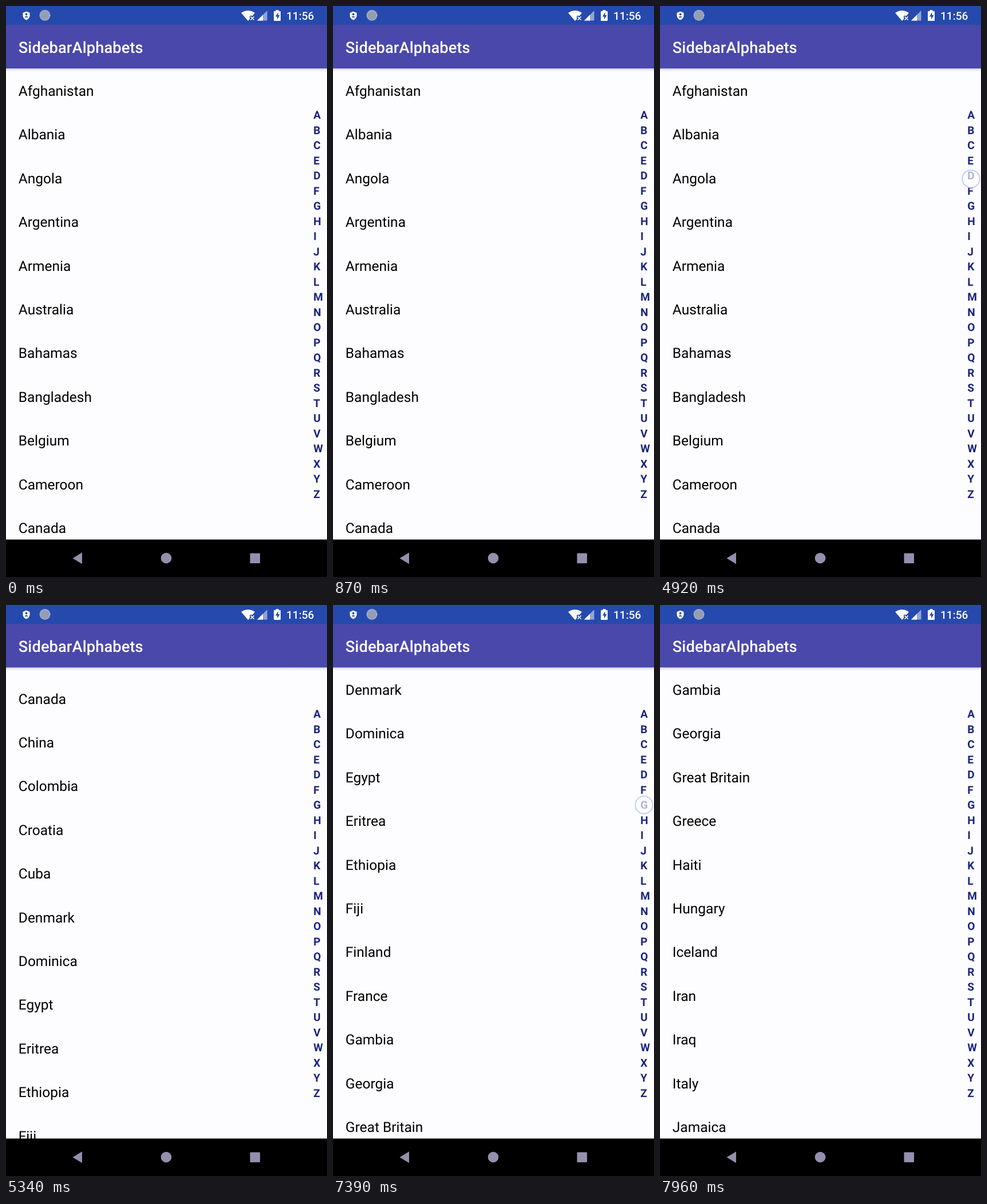
Write an HTML page that moves like this. It is 561x998 px and loops after 8000 ms.

```html
<!DOCTYPE html>
<html lang="en">
<head>
<meta charset="utf-8">
<title>SidebarAlphabets</title>
<style>
  html, body { margin: 0; width: 100%; height: 100%; overflow: hidden; background: #fdfdff; }
  svg { display: block; width: 561px; height: 998px; font-family: Roboto, sans-serif; text-rendering: geometricPrecision; }
  #list { font-size: 24.5px; }
  #index { font-size: 19.1px; font-weight: 700; fill: #1a237e; }
  .bar { fill: #fff; font-weight: 500; }
  .title { font-size: 27.27px; letter-spacing: .08px; }
  .clock { font-size: 19.1px; }
</style>
</head>
<body>
<svg viewBox="0 0 561 998">
  <defs>
    <linearGradient id="shadow" x2="0" y2="1">
      <stop offset="0" stop-color="#b9b9dc"/>
      <stop offset=".3" stop-color="#e4e4fa"/>
      <stop offset="1" stop-color="#fdfdff"/>
    </linearGradient>
  </defs>
  <rect width="561" height="998" fill="#fdfdff"/>
  <rect y="109" width="561" height="6" fill="url(#shadow)"/>
  <g id="list"></g>
  <g id="index"></g>
  <g id="touch">
    <circle r="15.3" fill="#fff" fill-opacity=".66" stroke="#c3cdf8" stroke-width="2"/>
  </g>

  <rect y="33" width="561" height="76" fill="#4a48ab"/>
  <rect width="561" height="33" fill="#2649ad"/>
  <text class="bar title" x="21.8" y="81.5">SidebarAlphabets</text>
  <text class="bar clock" x="490" y="24">11:56</text>

  <g fill="#fff">
    <path d="M35.5 9.500l6 2.400v4.600c0 4-2.800 6.700-6 8c-3.200-1.300-6-4-6-8v-4.600z"/>
    <path d="M411 12q12-8 24 0l-4 5h-5v6l-3 3z"/>
    <path d="M439 25.500l10-10v10z"/>
    <path d="M439 25.500l17.500-17.500v17.500z" opacity=".5"/>
    <path d="M471.500 9v-2h5v2h2.500q1 0 1 1v15q0 1-1 1h-10q-1 0-1-1v-15q0-1 1-1z"/>
  </g>
  <path d="M427.500 18.500l6 6m0-6l-6 6" stroke="#fff" stroke-width="1.700"/>
  <path d="M475.500 11l-4.500 7.500h3v5l4.500-7.500h-3z" fill="#2649ad"/>
  <circle cx="35.500" cy="14.500" r="1.900" fill="#2649ad"/>
  <path d="M32.300 20q3.200-4.500 6.400 0z" fill="#2649ad"/>
  <circle cx="68" cy="16.300" r="8.500" fill="#959db2"/>
  <circle cx="68" cy="16.300" r="8.700" fill="none" stroke="#d5d9e4" stroke-width="1.500" stroke-dasharray="1.500 1"/>

  <rect y="932.5" width="561" height="65.5" fill="#000"/>
  <g fill="#9390ae">
    <path d="M116.500 965.300l16.500-10v20z"/>
    <circle cx="280" cy="965" r="9.300"/>
    <rect x="426.500" y="956.500" width="17.500" height="17.500" rx="1"/>
  </g>
</svg>
<script>
const LOOP = 8000, FADE = 150, ROW = 76.4;
const countries = `Afghanistan,Albania,Angola,Argentina,Armenia,Australia,Bahamas,Bangladesh,Belgium,
Cameroon,Canada,China,Colombia,Croatia,Cuba,Denmark,Dominica,Egypt,Eritrea,Ethiopia,Fiji,Finland,France,
Gambia,Georgia,Great Britain,Greece,Haiti,Hungary,Iceland,Iran,Iraq,Italy,Jamaica`.split(/,\s*/);

const taps = [
  { down: 4920, up: 5080, y: 302, target: "Denmark", start: 5080, end: 5715 },
  { down: 7390, up: 7550, y: 349.5, target: "Gambia", start: 7562.5, end: 7960 }
];

const list = document.getElementById("list");
const touch = document.getElementById("touch");

function addTexts(parent, labels, x, y, pitch) {
  labels.forEach((label, i) => {
    const text = document.createElementNS("http://www.w3.org/2000/svg", "text");
    text.setAttribute("x", x);
    text.setAttribute("y", y + i * pitch);
    text.textContent = label;
    parent.append(text);
  });
}
addTexts(list, countries, 21.8, 157, ROW);
addTexts(document.getElementById("index"), [..."ABCEDFGHIJKLMNOPQRSTUVWXYZ"], 537.2, 197, 26.52);

const clamp = v => Math.max(0, Math.min(1, v));
const decelerate = p => 1 - (1 - p) ** 2;

function draw(now) {
  const t = now % LOOP;
  let row = 0, opacity = 0;
  for (const tap of taps) {
    const progress = decelerate(clamp((t - tap.start) / (tap.end - tap.start)));
    row += (countries.indexOf(tap.target) - row) * progress;
    if (t >= tap.down && t < tap.up + FADE) {
      opacity = 1 - clamp((t - tap.up) / FADE);
      touch.setAttribute("transform", `translate(543.5 ${tap.y})`);
    }
  }
  list.setAttribute("transform", `translate(0 ${-row * ROW})`);
  touch.setAttribute("opacity", opacity);
}

const began = performance.now();
function tick() {
  draw(performance.now() - began);
  requestAnimationFrame(tick);
}
tick();
</script>
</body>
</html>
```
